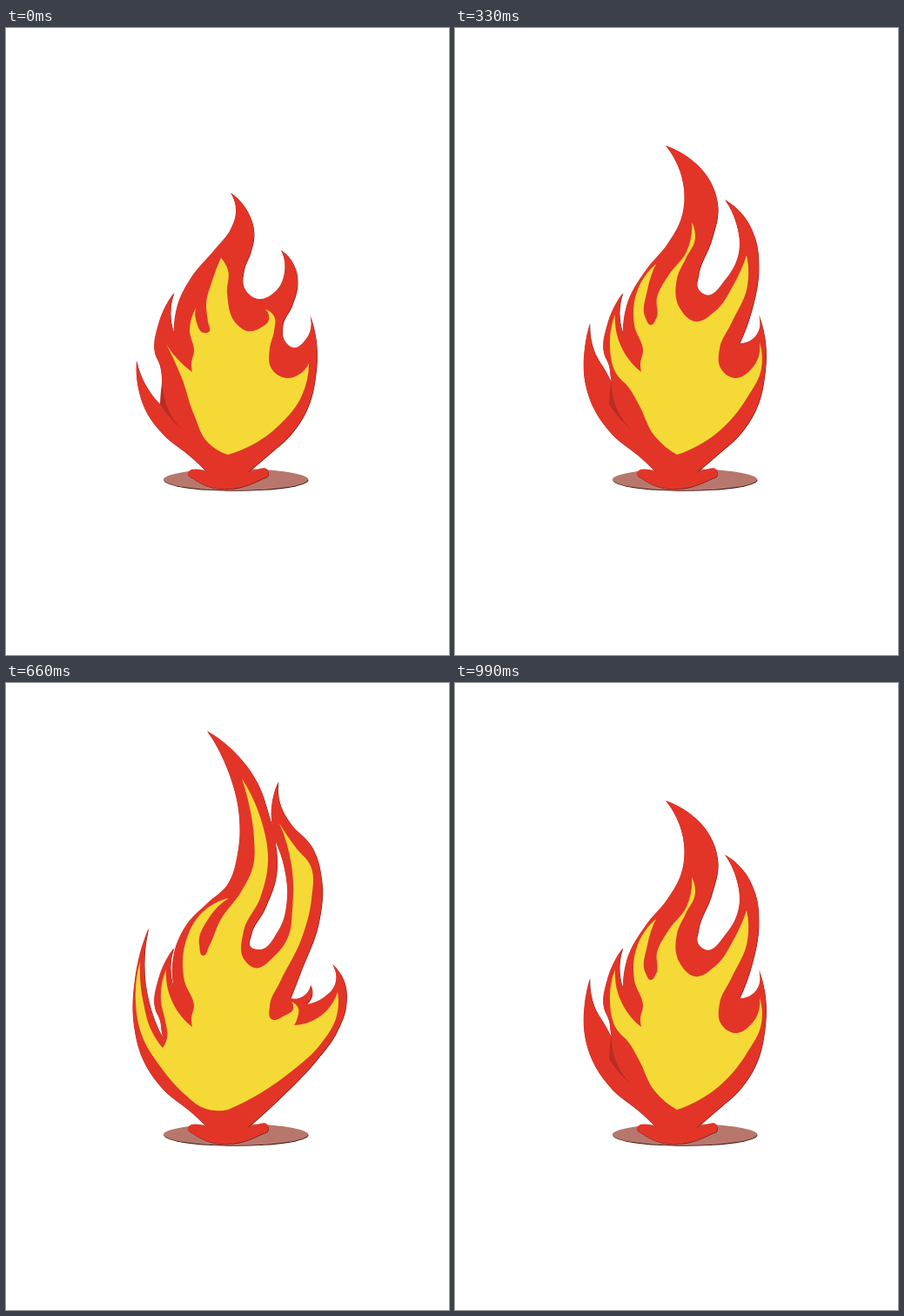
An HTML page for the animation above (1.32 s loop, 509 by 720 pixels).

```html
<!DOCTYPE html>
<html lang="en">
<head>
<meta charset="utf-8">
<title>Flame</title>
<style>
  html, body { margin: 0; width: 100%; height: 100%; overflow: hidden; background: #fff; }
  svg { display: block; width: 100%; height: 100%; }
</style>
</head>
<body>
<svg viewBox="0 0 509 720">
  <defs>
    <ellipse id="ground" cx="264" cy="518.5" rx="83" ry="12.5"/>
    <path id="outer"/>
  </defs>
  <use href="#ground" x=".4" y=".8" fill="#35110d"/>
  <use href="#ground" fill="#b8776c"/>
  <use href="#outer" x=".4" y=".6" fill="#5a1510"/>
  <use href="#outer" fill="#e23528"/>
  <path id="shade" fill="#b92c23"/>
  <path id="inner" fill="#f5d936"/>
</svg>
<script>
const HOLD = 330;
const $ = id => document.getElementById(id);
const mix = (p, q, k) => [p[0] + q[0] * k, p[1] + q[1] * k];
const sub = (p, q) => mix(p, q, -1);

// Unit tangent at q of the circle through p, q and r
function tangent(p, q, r) {
  const a = sub(q, p), b = sub(r, q);
  const t = mix(mix([0, 0], a, 1 / Math.hypot(...a) ** 2), b, 1 / Math.hypot(...b) ** 2);
  return mix([0, 0], t, 1 / Math.hypot(...t));
}

// Closed curve through the points; "|" follows each sharp corner
function trace(text) {
  const runs = text.split("|").map(run => run.trim().split(/\s+/).map(p => p.split(",").map(Number)));
  let pen = runs.at(-1).at(-1);
  let d = "M" + pen;
  for (const run of runs) {
    const pts = [pen, ...run];
    for (let i = 1; i < pts.length; i++) {
      const [o, p, q, r] = [pts[i - 2], pts[i - 1], pts[i], pts[i + 1]];
      const chord = sub(q, p), reach = Math.hypot(...chord) * 0.35;
      let a = o && mix(p, tangent(o, p, q), reach);
      let b = r && mix(q, tangent(p, q, r), -reach);
      if (!a && !b) [a, b] = [p, q];
      a ||= mix(b, chord, -1 / 3);
      b ||= mix(a, chord, 1 / 3);
      d += `C${a} ${b} ${q}`;
    }
    pen = pts.at(-1);
  }
  return d + "Z";
}

// Pieces shared between poses
const rightEdge = "| 356,356 356,398 345,440 328,466 303,489 277,511";
const foot = "| 288,507 300,507 301,514 296,517 | 214,517 209,513 213,507 | 223,507 232,511 | 213,493 180,466";
const notch = "| 179,402 177,388 171,373 175,340 193,304 | 189,326 193,350 |";
const leftTongue = "178,365 184,329 | 191,366 214,395 | 213,385 216,372";
const crease = trace("184,432 205,463 | 190,449 177,432 | 178,417 180,403");

function makePose(outer, inner, shade) {
  return { outer: trace(outer.join(" ")), inner: trace(inner.join(" ")), shade };
}

const low = makePose([
  "276,208 285,236 281,258 274,276 274,299 289,311 310,302 320,280 316,255",
  "| 332,275 335,295 329,318 318,342 320,359 331,367 344,358 349,329",
  rightEdge, foot,
  "163,444 152,414 150,382 | 161,411 177,432", notch,
  "197,318 213,286 240,254 258,231 264,212 258,189"
], [
  "255,278 254,304 266,341 277,348 293,344 302,335 298,323",
  "| 308,331 308,348 303,368 305,391 322,402 338,397 348,385",
  "| 340,422 314,456 286,477 255,490 | 232,476 216,444 202,402 183,361",
  "| 197,380 214,395 | 213,385 216,372 211,346 218,322",
  "| 219,338 227,350 233,349 232,337 230,318 237,290 247,264"
], crease);

const mid = makePose([
  "270,150 292,174 302,205 295,243 280,283 279,299 287,306 312,287 326,258 323,224 310,197",
  "| 331,215 345,242 349,275 341,324 327,362 | 342,357 349,329",
  rightEdge, foot,
  "161,440 150,410 149,367 155,339 | 160,371 173,394 180,407", notch,
  "197,319 220,277 244,248 260,218 263,185 255,156 242,135"
], [
  "276,241 265,265 255,288 258,321 276,337 298,326 320,295 335,261",
  "| 336,296 317,340 304,368 306,392 322,402 341,391 350,361",
  "| 352,391 336,424 301,465 255,490 | 229,468 212,434 199,412 186,398",
  leftTongue,
  "206,341 209,303 231,271 | 221,301 219,333 225,341 231,334 232,310 246,283 266,257 272,223"
], crease);

const high = makePose([
  "267,84 291,119 301,148 309,180 311,218 297,260 282,288 281,303 290,306",
  "313,284 323,246 318,205 307,172 305,142 313,113",
  "| 316,142 326,160 352,189 363,228 359,277 339,331 327,362 | 341,360 350,347",
  "| 352,356 345,369 | 365,361 378,346 375,323",
  "| 388,341 391,369 380,401 357,433 320,472 277,511", foot,
  "158,434 147,394 148,340 164,281 | 159,323 164,365 180,407", notch,
  "192,315 207,278 231,253 254,232 266,196 268,155 257,106 231,55"
], [
  "293,157 301,205 292,247 273,285 274,318 285,327 308,314 324,292 329,260 328,209 314,161",
  "| 333,189 350,210 351,248 339,295 315,343 303,371 305,386 320,382 330,374 328,366",
  "| 336,374 335,384 331,393 | 354,387 381,355 | 380,382 362,414 328,446 255,490",
  "| 227,488 205,472 177,440 157,407 149,367 154,320 | 158,368 168,401 180,419 | 185,408 183,388",
  leftTongue,
  "205,342 206,299 226,263 256,247 | 233,270 222,300 227,313 233,303 247,271 270,240 284,210 285,178 280,143 271,110"
], "");

const poses = [low, mid, high, mid];
const start = performance.now();
let shown;

function draw(now) {
  const pose = poses[Math.floor(Math.max(0, now - start) / HOLD) % poses.length];
  if (pose !== shown) {
    for (const part in pose) $(part).setAttribute("d", pose[part]);
    shown = pose;
  }
  requestAnimationFrame(draw);
}
draw(start);
</script>
</body>
</html>
```
